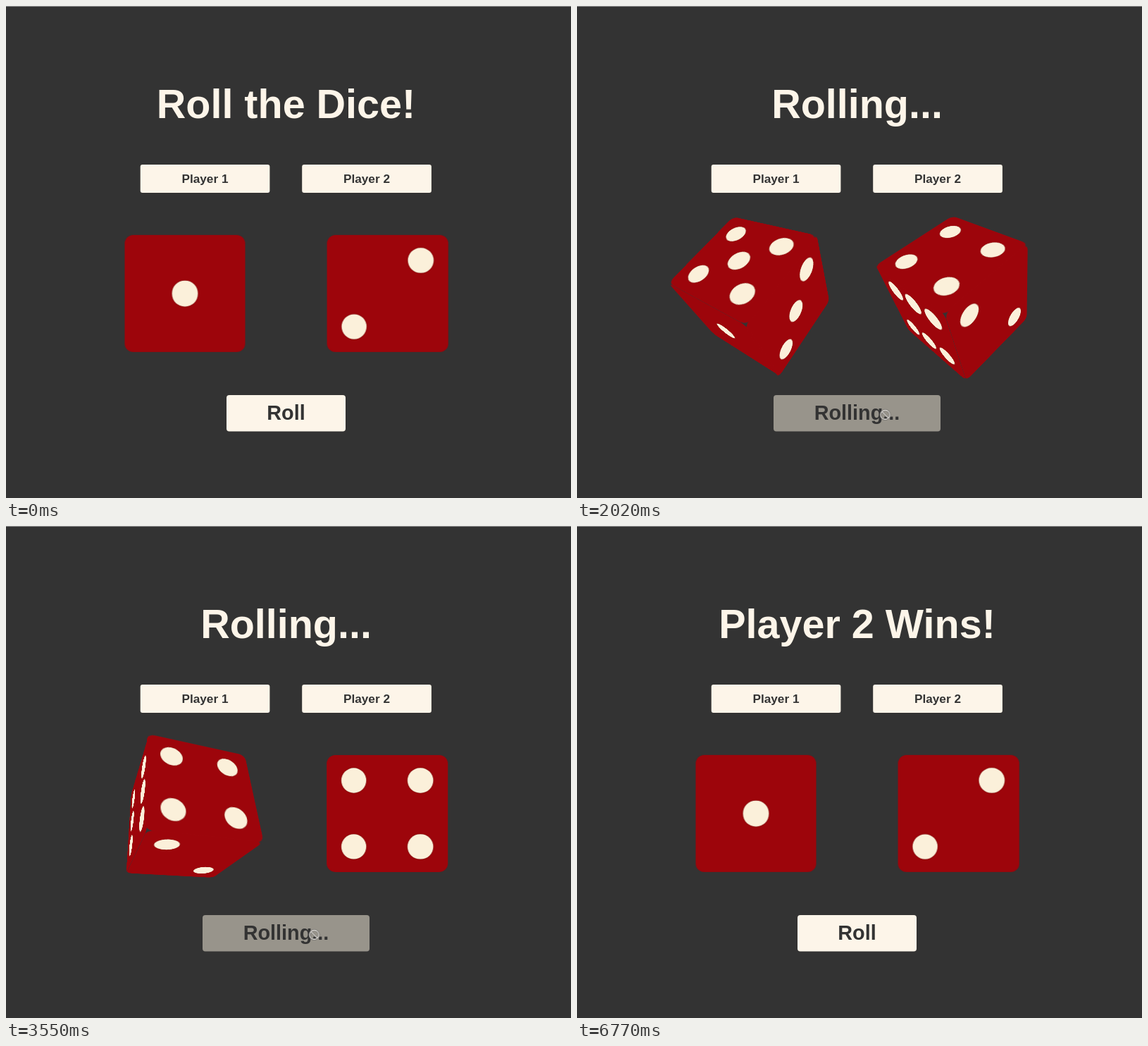
An HTML page for the animation above (7230 ms loop, 802 px wide and 698 px high).

```html
<!DOCTYPE html>
<html lang="en">
<head>
<meta charset="utf-8">
<title>Roll the Dice!</title>
<style>
:root { --cream: #fdf5e9; --hover: #d5ccc1; --off: #98948b; --dark: #333; }
html, body { margin: 0; width: 100%; height: 100%; overflow: hidden; background: var(--dark); }
.stage { position: absolute; left: 0; top: 0; width: 802px; height: 698px; overflow: hidden; }
svg { position: absolute; left: 0; top: 0; }
text { font: bold 17.2px "Liberation Sans", Arial, sans-serif; text-anchor: middle; fill: var(--dark); }
.title text { font-size: 57.5px; fill: var(--cream); }
.button text { font-size: 28.8px; }
.label rect { fill: var(--cream); }

/* Which texts show when */
.intro, .rolling, .result, .idle { animation: 7230ms step-end infinite; }
.intro { animation-name: intro; }
.rolling { animation-name: rolling; }
.result { animation-name: result; }
.idle { animation-name: idle; }
@keyframes intro { 0% { visibility: visible; } 15.63%, 100% { visibility: hidden; } }
@keyframes rolling { 0%, 71.78%, 100% { visibility: hidden; } 15.63% { visibility: visible; } }
@keyframes result { 0% { visibility: hidden; } 71.78%, 100% { visibility: visible; } }
@keyframes idle { 0%, 71.78%, 100% { visibility: visible; } 15.63% { visibility: hidden; } }

.idle rect { animation: hover 7230ms linear infinite; }
.rolling rect { animation: disable 7230ms linear infinite; }
@keyframes hover {
  0%, 9.96% { fill: var(--cream); }
  12.72%, 50% { fill: var(--hover); }
  50.01%, 71.78% { fill: var(--off); }
  74.27%, 87.7% { fill: var(--hover); }
  90.4%, 100% { fill: var(--cream); }
}
@keyframes disable {
  0%, 15.63% { fill: var(--hover); }
  18.2%, 100% { fill: var(--off); }
}

/* Pointer */
.pointer { animation: travel 7230ms linear infinite; }
@keyframes travel {
  0%, 1.8% { transform: translate(735px, 705px); animation-timing-function: ease-in; }
  5.6% { transform: translate(640px, 630px); }
  9.96% { transform: translate(481px, 590px); animation-timing-function: ease-out; }
  11.76%, 86.58% { transform: translate(437.5px, 582px); animation-timing-function: ease-in; }
  87.7% { transform: translate(482px, 586px); }
  90.6% { transform: translate(640px, 631px); }
  92.2% { transform: translate(695px, 664px); }
  93.64%, 100% { transform: translate(735px, 705px); }
}
.arrow, .hand { animation: arrow 7230ms step-end infinite; fill: #3d3546; }
.hand { animation-name: hand; }
@keyframes arrow { 0%, 87.7%, 100% { visibility: visible; } 9.96% { visibility: hidden; } }
@keyframes hand {
  0%, 15.63%, 87.7%, 100% { visibility: hidden; }
  9.96%, 71.78% { visibility: visible; }
}

/* Dice */
.scene { position: absolute; top: 408.3px; width: 0; height: 0; perspective: 375px; perspective-origin: 0 0; }
.cube { position: absolute; width: 0; height: 0; transform-style: preserve-3d; animation: 7230ms linear infinite; }
.face {
  position: absolute; left: -70.4px; top: -68px; width: 140.8px; height: 136px;
  border-radius: 10px; background: #9d050b; backface-visibility: hidden;
}
.face i {
  position: absolute; width: 29.2px; height: 29.2px; margin: -14.6px; border-radius: 50%;
  background: #fbf0da; box-shadow: 0 0 1px #5a1a10;
}
.one { animation-name: tumble-one; }
.two { animation-name: tumble-two; }
@keyframes tumble-one {
  0%, 15.63% { transform: rotateX(0deg) rotateY(0deg) rotateZ(0deg); }
  27.94% { transform: rotateX(295deg) rotateY(324deg) rotateZ(337deg); }
  32.37%, 37.48% { transform: rotateX(356deg) rotateY(313deg) rotateZ(365deg); }
  41.91% { transform: rotateX(416.9deg) rotateY(302.9deg) rotateZ(393.1deg); }
  56.98% {
    transform: rotateX(720deg) rotateY(570deg) rotateZ(718.8deg);
    animation-timing-function: cubic-bezier(.2, .5, .6, .95);
  }
  67.77% {
    transform: rotateX(720deg) rotateY(715.1deg) rotateZ(720deg);
    animation-timing-function: ease-out;
  }
  71.7%, 100% { transform: rotateX(720deg) rotateY(720deg) rotateZ(720deg); }
}
@keyframes tumble-two {
  0%, 15.63% { transform: rotateX(90deg) rotateY(0deg) rotateZ(0deg); }
  27.94% { transform: rotateX(484.7deg) rotateY(45.2deg) rotateZ(284.4deg); }
  32.37%, 37.48% {
    transform: rotateX(530deg) rotateY(-36deg) rotateZ(234deg);
    animation-timing-function: ease-out;
  }
  41.9% { transform: rotateX(560deg) rotateY(-90deg) rotateZ(200deg); }
  41.901%, 42.19% {
    transform: rotateX(0deg) rotateY(-90.4deg) rotateZ(0deg);
    animation-timing-function: ease-in-out;
  }
  47.44%, 57.68% {
    transform: rotateX(0deg) rotateY(-270deg) rotateZ(0deg);
    animation-timing-function: cubic-bezier(.2, .5, .6, .95);
  }
  67.77% {
    transform: rotateX(86.5deg) rotateY(-355.7deg) rotateZ(355.8deg);
    animation-timing-function: ease-out;
  }
  71.7%, 100% { transform: rotateX(90deg) rotateY(-360deg) rotateZ(360deg); }
}
</style>
</head>
<body>
<div class="stage">
  <svg width="802" height="698">
    <rect width="802" height="1" fill="#8c8c8c"/>
    <g class="title">
      <text class="intro" x="397.5" y="158.5">Roll the Dice!</text>
      <text class="rolling" x="397.5" y="158.5">Rolling...</text>
      <text class="result" x="397.5" y="158.5">Player 2 Wins!</text>
    </g>
    <g class="label">
      <rect x="190.7" y="225" width="183.7" height="40" rx="3"/>
      <text x="282.5" y="250.5">Player 1</text>
      <rect x="420.2" y="225" width="183.7" height="40" rx="3"/>
      <text x="512" y="250.5">Player 2</text>
    </g>
    <g class="button idle">
      <rect x="313" y="552" width="169" height="51.5" rx="4"/>
      <text x="397.5" y="587">Roll</text>
    </g>
    <g class="button rolling">
      <rect x="279" y="552" width="237" height="51.5" rx="4"/>
      <text x="397.5" y="587">Rolling...</text>
    </g>
  </svg>

  <div class="scene" style="left:254px"><div class="cube one"></div></div>
  <div class="scene" style="left:540.6px"><div class="cube two"></div></div>

  <svg width="802" height="698">
    <g class="pointer">
      <path class="arrow" d="M0 0v16l4-3.5 2.5 5.5 2.5-1-2.5-5.5h5z" stroke="#777" stroke-width=".6"/>
      <path class="hand" d="M-1.5 0q1.5-1.5 3 0v6l5 1q2 .5 2 2.5v3.5l-2 4h-6.5l-4.5-6.5q0-1.8 1.5-1.5l1.5 1.5z"/>
      <g class="rolling" fill="none" transform="translate(0 -2)">
        <path d="M6.5 0a6.5 6.5 0 1 0-13 0a6.5 6.5 0 1 0 13 0M-4.5-4.5l9 9" stroke="#666" stroke-width="2.4"/>
        <path d="M6.5 0a6.5 6.5 0 1 0-13 0a6.5 6.5 0 1 0 13 0M-4.5-4.5l9 9" stroke="#dcd8d2" stroke-width="1.3"/>
      </g>
    </g>
  </svg>
</div>
<script>
// Each face: its turn from the front, and its pips as cells of a 3 by 3 grid.
const faces = [
  ['rotateY(0deg)', '4'],
  ['rotateX(-90deg)', '26'],
  ['rotateY(90deg)', '246'],
  ['rotateY(-90deg)', '0268'],
  ['rotateX(90deg)', '02468'],
  ['rotateY(180deg)', '035268']
];
const pipGap = 38.6;

function add(parent, tag) {
  return parent.appendChild(document.createElement(tag));
}

for (const cube of document.querySelectorAll('.cube')) {
  for (const [turn, cells] of faces) {
    const face = add(cube, 'div');
    face.className = 'face';
    face.style.transform = `${turn} translateZ(68px)`;
    for (const cell of cells) {
      const pip = add(face, 'i');
      pip.style.left = `calc(50% + ${(cell % 3 - 1) * pipGap}px)`;
      pip.style.top = `calc(50% + ${(Math.floor(cell / 3) - 1) * pipGap}px)`;
    }
  }
}
</script>
</body>
</html>
```
